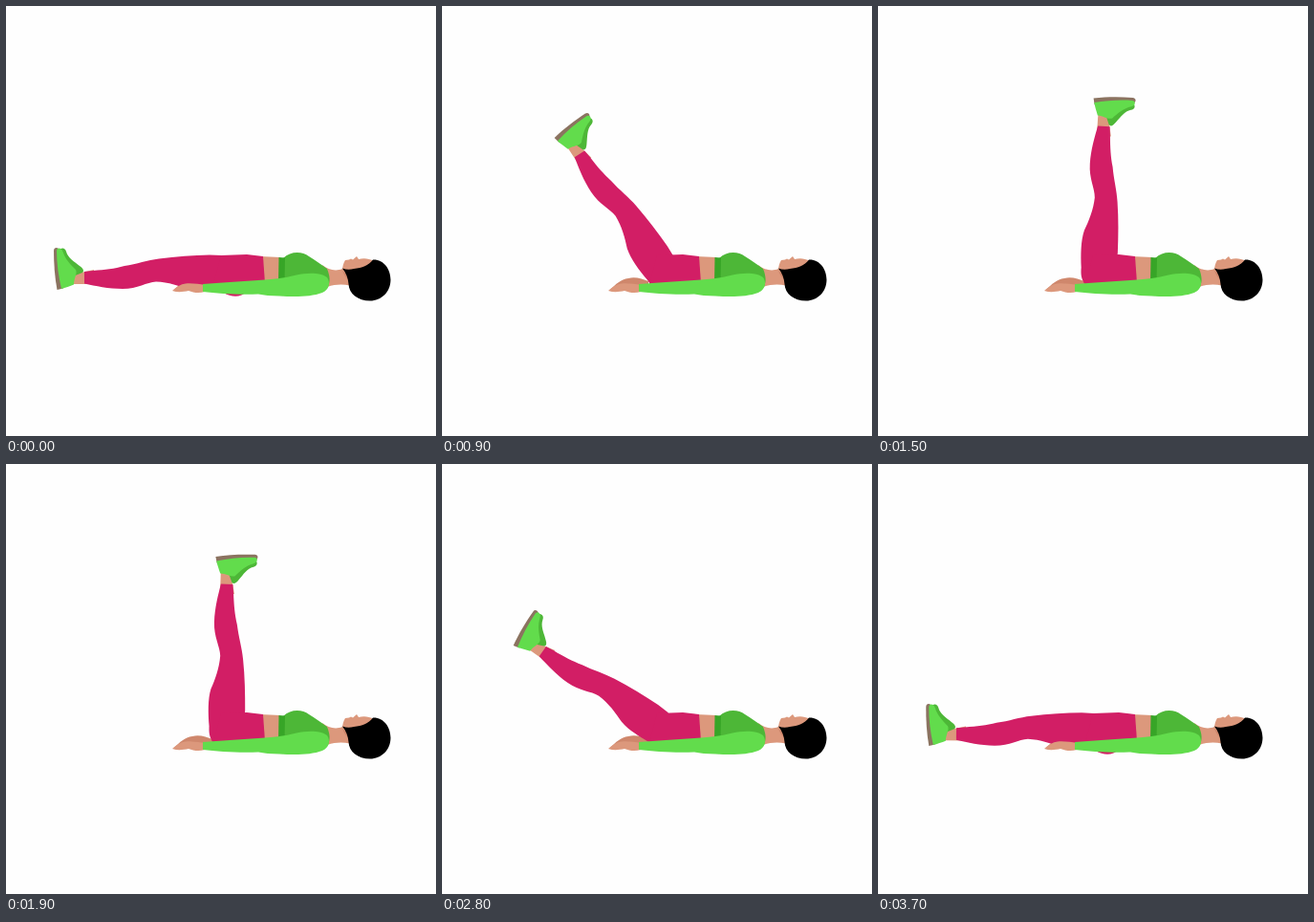
Animation, 450 px wide and 450 px high, one loop 3.8 s. Source, as an HTML page:

```html
<!DOCTYPE html>
<html lang="en">
<head>
<meta charset="utf-8">
<title>Leg raise</title>
<style>
  html, body { margin: 0; width: 100%; height: 100%; overflow: hidden; background: #fefefe; }
  svg { display: block; width: 100vw; height: 100vh; }
  .skin { fill: #dc987c; }
  .shade { fill: #cf876c; }
  .pants { fill: #d21e65; }
  .lime { fill: #62dc4c; }
  .green { fill: #4db737; }
  .band { fill: #37a527; }
  .sole { fill: #8b7360; }
  .hair { fill: #000; }
</style>
</head>
<body>
<svg viewBox="0 0 450 450">
  <!-- far hand -->
  <path class="shade" d="M176 297 C182 291 187 286 195 285 C203 283 210 286 216 288 L216 295 L190 297Z"/>

  <!-- waist and neck -->
  <path class="skin" d="M266 262 L287 263 L287 290 L266 290Z"/>
  <path class="skin" d="M331 271 C337 276 345 278 352 275 L361 276 L360 292.500 C352 291 345 291 336 294Z"/>
  <path class="shade" d="M352 276 L359 277 L359 287 C355 284 353 280 352 276Z"/>

  <!-- head -->
  <path class="skin" d="M352 277 C352 273 353 269 355 266 L359 265.500 L361 264.500 L363 265.500 L367 262 L369 265 C374 263.500 380 264 385 267 L383 280 L360 284Z"/>
  <path class="hair" d="M352 274.500 C356 276 360 276 364 275 C373 274 379 272 384 265.500 C395 265 402.500 275 402.500 286.500 C402.500 299 393 308.500 381 308.500 C368 308.500 359 301 358.500 291 C358 285 356 279 352 274.500Z"/>

  <!-- raised part -->
  <g id="leg">
    <path class="skin" d="M69 281 L92 276 L92 291 L69 291Z"/>
    <path class="green" d="M55 256 C58 252 62 253 63 257 C65 264 71 267 77 272 C81 275 82 277 80 279 L70 283Z"/>
    <path class="sole" d="M50 256 C50 253 53 252 55 254 L60 295.500 L53.500 297 C51 284 50 269 50 256Z"/>
    <path class="lime" d="M53 256 C54 252 58 253 59.500 257 C62 265 67 270 73 276 C75 280 71 285 71 291.500 C67 293 62 295 58 296 C55 283 53 270 53 256Z"/>
    <path class="pants" d="M82 278 L91 277 C104 276 113 275 124 272 C137 270 148 266 160 264.5 C178 262 196 261 213 260.5 L226 261 L252 278 L249 292 C243 297 238 297.500 231 297.500 C218 299 203 300 192 297 C182 293 170 289 157 288.500 C147 289 138 296 122 296 C107 296 94 293 82 290.500Z"/>
  </g>

  <!-- hips -->
  <path class="pants" d="M269 262 L252 260 L225 261 L217 291 L250 294 L271 290Z"/>
  <path class="pants" id="seat" d="M228 300 L250 300 C246 305 235 305 228 300Z"/>

  <!-- top -->
  <path class="green" d="M290 264 C298 256 310 256.500 317 262 C324 266 330 271 336 275 C339 282 340 290 336 295 L290 292Z"/>
  <path class="band" d="M285.500 263 L292 263.500 L291.500 291 L285 290Z"/>

  <!-- near arm and hand -->
  <path class="skin" d="M174 298 C178 294 183 291 188 290.500 C195 290 202 291 208 292 L208 299 C202 301 196 300 191 298 C186 299 180 300 174 298Z"/>
  <path class="lime" d="M206 291 C224 290 244 288 264 287 C278 286 291 285 304 281.500 C315 279 329 278.500 336 284 C340 290 338 297 331 300 C319 304.500 303 304.500 286 303.500 C277 303.500 270 302.500 264 301.500 C245 302.500 222 301 206 299Z"/>
</svg>
<script>
  const LOOP = 3800, STEP = 100, TOP = 94;
  const leg = document.getElementById('leg');
  const seat = document.getElementById('seat');

  // eased progress between two moments; a larger lag lengthens the tail
  const ease = (t, a, b, lag = 1) => {
    const left = 1 - Math.min(1, Math.max(0, (t - a) / (b - a)));
    return (1 + Math.cos(Math.PI * left ** lag)) / 2;
  };

  function draw(time) {
    const t = Math.floor((time % LOOP) / STEP) * STEP;
    const angle = TOP * (ease(t, 170, 1460) - ease(t, 1746, 3940, 1.33));
    leg.setAttribute('transform', `rotate(${angle.toFixed(2)} 233 277)`);
    seat.style.display = angle < 5 ? '' : 'none';
  }

  const start = performance.now();
  function tick() {
    draw(performance.now() - start);
    requestAnimationFrame(tick);
  }
  tick();
</script>
</body>
</html>
```
